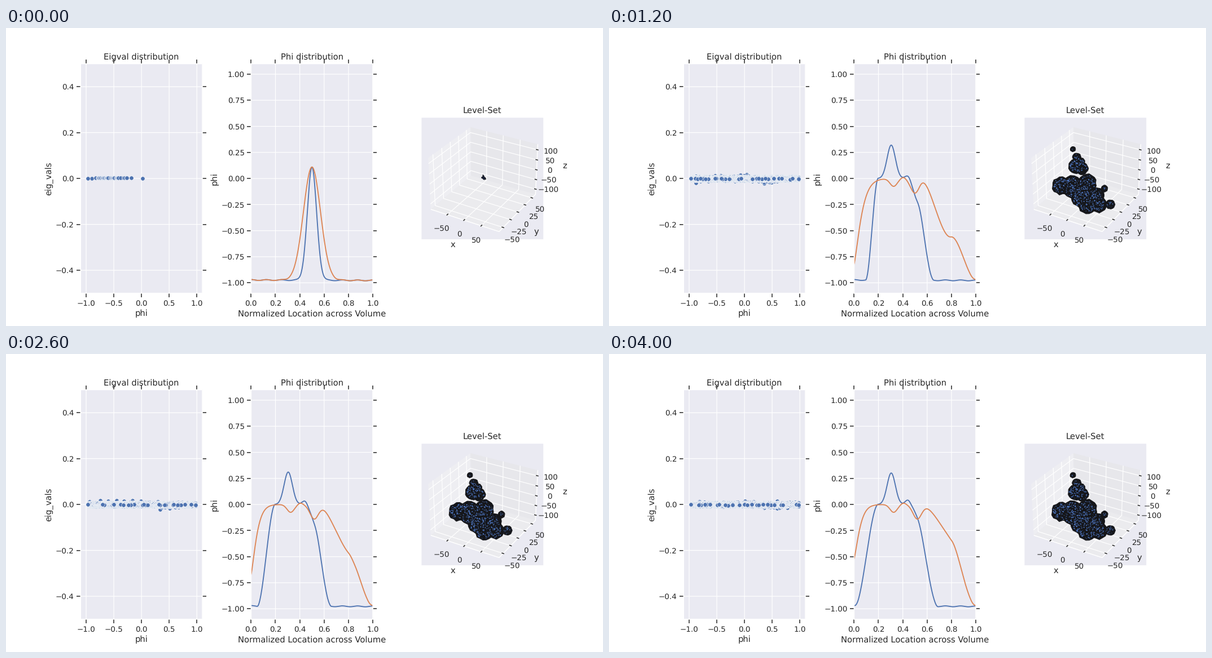
A matplotlib script that plays this animation: 1058 by 529 pixels, repeating every 6 s.

```python
import numpy as np
import matplotlib.pyplot as plt
from matplotlib.animation import FuncAnimation
from matplotlib.collections import PolyCollection
from matplotlib.patches import Polygon

DARK, PANEL, BLUE, ORANGE = "#262626", "#EAEAF2", "#4C72B0", "#DD8452"
INK = "#15161a"
LAST, FRAMES, STEP = 20, 30, 200

plt.rcParams.update({"font.family": "DejaVu Sans", "text.color": DARK,
                     "axes.labelcolor": DARK, "font.size": 12,
                     "text.hinting": "none", "path.snap": False})
fig = plt.figure(figsize=(12, 6), dpi=1058 / 12, facecolor="white")
grid = fig.add_gridspec(1, 3, left=0.125, right=0.9, bottom=0.11, top=0.88,
                        wspace=0.4)


def plot_panel(cell, title, xlabel, ylabel, xlim, ylim, xticks, yticks):
    ax = fig.add_subplot(cell, facecolor=PANEL)
    ax.set(xlim=xlim, ylim=ylim, xticks=xticks, yticks=yticks)
    ax.set_title(title, fontsize=12, y=1.0, pad=6)
    ax.set_xlabel(xlabel, fontsize=12)
    ax.set_ylabel(ylabel, fontsize=12)
    ax.set_axisbelow(True)
    ax.grid(color="white", lw=1)
    ax.tick_params(length=6, width=1.25, color=DARK, labelcolor=DARK,
                   labelsize=11, pad=3.5, top=True, right=True)
    for spine in ax.spines.values():
        spine.set(color="white", linewidth=1.25)
    return ax


eig = plot_panel(grid[0], "Eigval distribution", "phi", "eig_vals",
                 (-1.1, 1.1), (-0.5, 0.5),
                 np.arange(-2, 3) / 2, np.arange(-2, 3) / 5)
phi = plot_panel(grid[1], "Phi distribution",
                 "Normalized Location across Volume", "phi",
                 (0, 1), (-1.1, 1.1), np.arange(6) / 5, np.arange(-4, 5) / 4)

# ---- 3D box, projected by hand -------------------------------------------
box = fig.add_subplot(grid[2], facecolor=PANEL)
box.set(xlim=(-0.095, 0.09), ylim=(-0.095, 0.09), xticks=[], yticks=[])
box.set_aspect("equal")
for spine in box.spines.values():
    spine.set_visible(False)

A, C = 0.5953, 0.4464               # half sizes of the box
UX, UY, UZ = 0.592 / 100, 0.473 / 50, 0.35 / 100   # box units per data unit
UNIT = 0.185 / 215.78               # view units per pixel
OUT, IN = 0.0095, 0.019             # tick reach


def project(x, y, z):
    w = 10 - (0.433 * x - 0.75 * y + 0.5 * z)
    return (0.866 * x + 0.5 * y) / w, (-0.25 * x + 0.433 * y + 0.866 * z) / w


def from_px(points):
    return (np.asarray(points, float) - (847.2, 264.2)) * (UNIT, -UNIT)


def stroke(*points, color="white", lw=1.0, cap="butt", z=1.5):
    xs, ys = zip(*(project(*p) for p in points))
    box.plot(xs, ys, color=color, lw=lw, solid_capstyle=cap, zorder=z)


def tick(start, end):
    stroke(start, end, color=DARK, lw=1.25, cap="projecting", z=3)


def pane(grey, *points):
    box.add_patch(Polygon([project(*p) for p in points], fc=(grey,) * 3,
                          ec="none", alpha=0.5, zorder=1))


pane(0.95, (-A, -A, -C), (-A, A, -C), (-A, A, C), (-A, -A, C))
pane(0.90, (-A, A, -C), (A, A, -C), (A, A, C), (-A, A, C))
pane(0.925, (-A, -A, -C), (A, -A, -C), (A, A, -C), (-A, A, -C))

X_TICKS, Y_TICKS, Z_TICKS = [-50, 0, 50], range(-50, 51, 25), range(-100, 101, 50)
for t in np.multiply(X_TICKS, UX):
    stroke((t, -A, -C), (t, A, -C), (t, A, C))
    tick((t, -A - OUT, -C), (t, -A + IN, -C))
for t in np.multiply(Y_TICKS, UY):
    stroke((A, t, -C), (-A, t, -C), (-A, t, C))
    tick((A + OUT, t, -C), (A - IN, t, -C))
for t in np.multiply(Z_TICKS, UZ):
    stroke((A, A, t), (-A, A, t), (-A, -A, t))
    tick((A + OUT, A, t), (A - IN, A, t))
stroke((-A, -A, -C), (A, -A, -C), (A, A, -C), (A, A, C), lw=1.25)


def label(text, px, py, size=11):
    x, y = from_px((px, py))
    box.text(x, y, text, fontsize=size, ha="center", va="center")


def tick_labels(values, start, end):
    for v, at in zip(values, np.linspace(start, end, len(values))):
        label(str(v).replace("-", "\u2212"), *at)


tick_labels(X_TICKS, (772, 356), (834, 377))
tick_labels(Y_TICKS, (896.5, 376), (947, 322))
tick_labels(Z_TICKS, (961, 287.5), (965.3, 219))
label("x", 791.5, 385, 12)
label("y", 940, 362, 12)
label("z", 990, 245, 12)
label("Level-Set", 844, 147, 12)


# ---- timing --------------------------------------------------------------
def ramp(x, start, end):
    t = np.clip((x - start) / (end - start), 0, 1)
    return t * t * (3 - 2 * t)


def mix(a, b, t):
    return a + (b - a) * t


def phases(k):
    """Growth of the seed, closing of the gap, slow settling; each 0 to 1."""
    return (ramp(k, 0, 4), np.clip((k - 4) / 2, 0, 1),
            np.clip((k - 6) / 14, 0, 1))


# ---- curves --------------------------------------------------------------
X = np.linspace(0, 1, 400)
FLOOR = -0.975


def bell(x, centre, width):
    return np.exp(-((x - centre) / width) ** 2 / 2)


def blue_curve(k):
    grow, close, settle = phases(k)
    rise = ramp(X, mix(0.095, 0.005, settle), 0.198)
    fall = ramp(X, mix(0.56, 0.48, close),
                mix(0.665, 0.655, close) + 0.035 * settle**3)
    gap = mix(0.9, 0.13, close) - 0.08 * settle
    y = (FLOOR * (1 - rise * (1 - fall))
         + (0.34 - 0.02 * close - 0.018 * settle) * bell(X, 0.305, 0.034)
         + (0.03 + 0.015 * settle) * bell(X, 0.442, 0.022)
         - gap * bell(X, 0.5, mix(0.04, 0.025, close)))
    return finish(y, grow, 0.038)


def orange_curve(k):
    grow, close, settle = phases(k)
    depth = 0.86 - 0.04 * close - 0.3 * settle
    reach = 0.085 - 0.015 * close - 0.015 * min(1, 3 * settle)
    step = 0.6 - 0.04 * close - 0.11 * settle
    y = (-depth * np.exp(-(X / reach) ** 1.3)
         - 0.075 * bell(X, 0.325, 0.03)
         + 0.015 * close * bell(X, 0.405, 0.02)
         - mix(0.88, 0.14, close) * bell(X, 0.5 + 0.02 * min(1, 3 * settle),
                                         mix(0.06, 0.036, close))
         - step * ramp(X, mix(0.6, 0.54, close), 0.79 + 0.13 * settle)
         - (0.97 - step) * ramp(X, 0.8, 1))
    return finish(y, grow, 0.07)


def finish(y, grow, width):
    """Open from the first peak and add the faint ripple near the floor."""
    y = mix(FLOOR + 1.085 * bell(X, 0.5, width), y, grow)
    ripple = 0.004 * np.cos(2 * np.pi * 8 * X) - 0.004 * X + 0.002
    return y + ripple * np.clip((-0.9 - y) / 0.06, 0, 1)


blue_line, = phi.plot(X, X, color=BLUE, lw=1.5)
orange_line, = phi.plot(X, X, color=ORANGE, lw=1.5)

# ---- eigenvalue dots -----------------------------------------------------
dots = eig.scatter([], [], s=36, color=BLUE, edgecolor="white",
                   linewidth=0.48, zorder=2)


def dot_places(k):
    rng = np.random.default_rng(40 + k)
    grow, close, _ = phases(k)
    top = 0.02 + 0.96 * min(1, 1.5 * grow)

    # loose dots around the band, with one sag and one swell
    x = rng.uniform(-0.95, top, int(260 * grow))
    y = rng.normal(0, 0.0055, x.size)
    y -= mix(0.032, 0.014, close) * bell(x, mix(-0.05, 0.45, close), 0.13) \
        * rng.random(x.size)
    y += mix(0.017, 0.008, close) * bell(x, mix(-0.75, 0, close), 0.15) \
        * rng.random(x.size)
    parts = [(x, y)]

    # tight sweeps, whose edges pile up to white
    for level in (0.0045, -0.0045, 0):
        x = np.sort(rng.uniform(-0.96, top, int(1500 * grow)))
        parts.append((x, level + rng.normal(0, 0.0012, x.size)))

    x = rng.uniform(-0.93, top, int(34 * grow))
    parts.append((x, rng.normal(-0.001, 0.001, x.size)))

    x = np.sort(rng.normal(-0.57, 0.19, int(50 * (1 - grow)))).clip(-0.9, -0.14)
    x = np.r_[x, top, -0.975]
    parts.append((x, 0.004 * np.sin(3 * x + 3.1)))
    return np.hstack(parts).T


# ---- level-set body ------------------------------------------------------
# lumps of the grown body: x, y, radius in pixels
LUMPS = np.array([
    (822, 215, 5), (829, 229, 8), (837, 237, 7), (827, 245, 14),
    (838, 249, 12), (848, 275, 17), (801, 280, 17), (821, 282, 21),
    (838, 300, 20), (848, 314, 17), (866, 312, 17), (888, 313, 9),
    (863, 297, 15), (878, 285, 6.5)])
HUB = np.array([847, 264.5])
SIDES = 18

base = np.random.default_rng(7)
ROUGH = base.uniform(0.9, 1.06, (len(LUMPS), SIDES, 1))
N = 2000
SPECK = base.uniform((782, 206), (899, 333), (N, 2))
TURN = base.uniform(0, 2 * np.pi, N)
SIZE = base.uniform(0.6, 1.6, N)
TINT = np.outer(base.uniform(0.7, 1.15, N), (0.33, 0.50, 0.82)).clip(0, 1)

body = box.add_collection(PolyCollection([], fc=INK, ec=INK, lw=0.8, zorder=4))
specks = box.add_collection(PolyCollection([], ec="none", zorder=5))


def ring(turn, steps):
    a = turn + 2 * np.pi * np.arange(steps) / steps
    return np.stack([np.cos(a), np.sin(a)], -1)


def draw_body(k):
    grow, _, settle = phases(k)
    scale = 0.07 + 0.93 * grow**2
    centre = LUMPS[:, :2]
    radius = LUMPS[:, 2] * (0.94 + 0.06 * settle)
    shape = centre[:, None] + ring(0, SIDES) * ROUGH * radius[:, None, None]
    body.set_verts(from_px(HUB + scale * (shape - HUB)))

    rng = np.random.default_rng(k)
    spots = SPECK + rng.normal(0, 0.5, SPECK.shape)
    gap = np.linalg.norm(spots[:, None] - centre, axis=2) - radius
    inside = gap.min(axis=1) < -2.5
    tri = ring(TURN[:, None], 3) * SIZE[:, None, None]
    tri = HUB + scale * (spots[:, None] - HUB) + tri * scale
    specks.set_verts(from_px(tri[inside]))
    specks.set_facecolor(TINT[inside])


def draw(frame):
    k = min(frame, LAST)
    blue_line.set_ydata(blue_curve(k))
    orange_line.set_ydata(orange_curve(k))
    dots.set_offsets(dot_places(k))
    draw_body(k)
    return blue_line, orange_line, dots, body, specks


anim = FuncAnimation(fig, draw, frames=FRAMES, interval=STEP, repeat=True,
                     blit=False)
plt.show()
```
